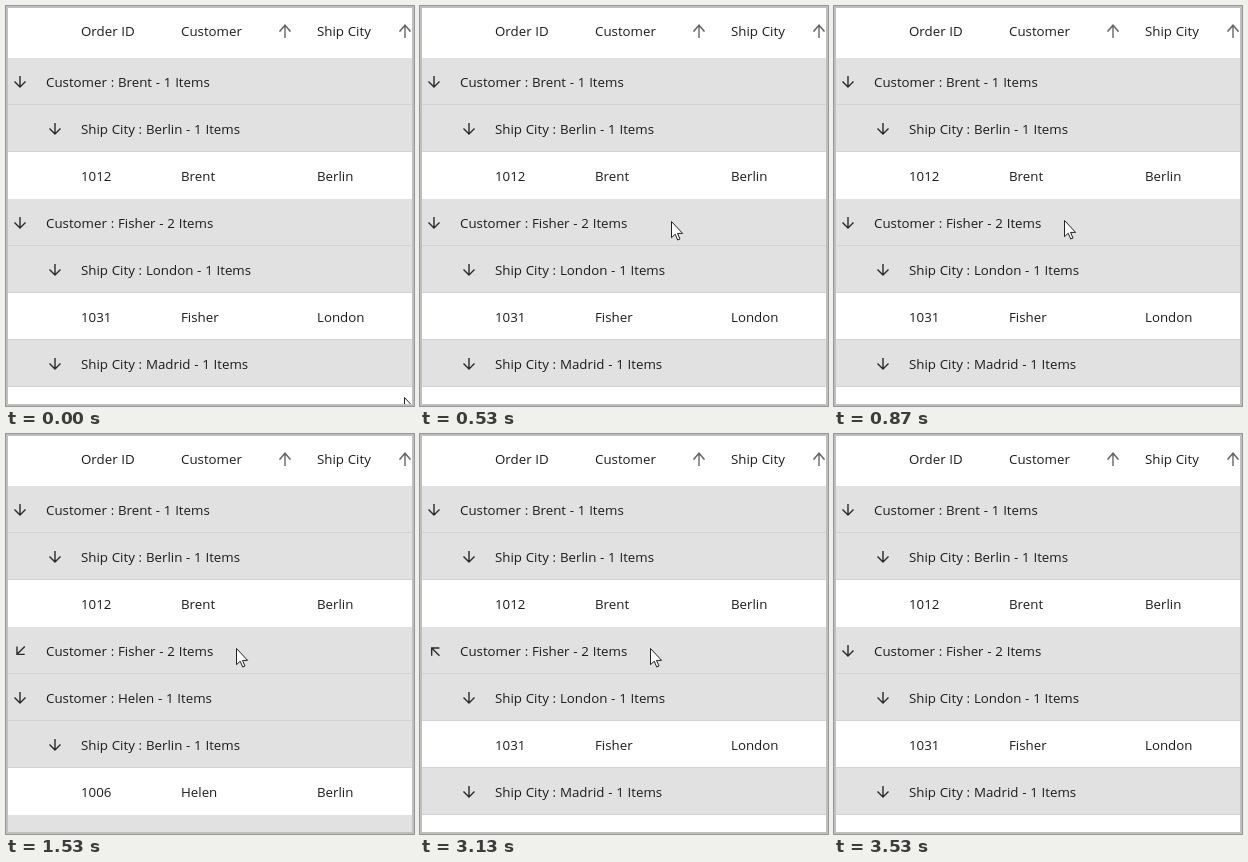
An HTML page for the animation above (4.59 s loop, 408x400 px).

```html
<!DOCTYPE html>
<html lang="en">
<head>
<meta charset="utf-8">
<title>Grouped orders</title>
<style>
  html, body { margin: 0; width: 100%; height: 100%; overflow: hidden; background: #fff; }
  svg { display: block; width: 408px; height: 400px; }
  text { font: 13.3px "Open Sans", "Noto Sans", sans-serif; word-spacing: .3px; fill: #1c1c1c; white-space: pre; }
  .arrow, .sort { fill: none; stroke: #2a2a2a; stroke-width: 1.4; }
  .sort { stroke: #666; }
</style>
</head>
<body>
<svg viewBox="0 0 408 400">
  <defs>
    <clipPath id="inner"><rect x="2" y="2" width="404" height="396"/></clipPath>
    <path id="down" d="M0-6V5M-5.5-.5L0 5L5.5-.5"/>
  </defs>
  <rect width="408" height="400" fill="#bfbfbf"/>
  <g clip-path="url(#inner)">
    <rect width="408" height="400" fill="#fff"/>
    <g id="fixed"></g>
    <g id="open"></g>
    <g id="closed"></g>
    <use id="toggle" class="arrow" href="#down" x="14" y="217"/>
    <path id="cursor" d="M.5 .5V16.7L4.2 13.2L6.7 19L9 18L6.5 12.4H11.6Z" fill="#fff" stroke="#222"/>
  </g>
</svg>
<script>
const LOOP = 4590, FRAME = 200 / 3;
const TOP = 52, ROW = 47, INDENT = 35;
const COLUMNS = [75, 175, 311];
const $ = id => document.getElementById(id);

const label = (x, y, s) => `<text x="${x}" y="${y}">${s}</text>`;
const cells = (y, values) => values.map((v, i) => label(COLUMNS[i], y, v)).join('');
const rect = (y, height, fill) => `<rect y="${y}" width="408" height="${height}" fill="${fill}"/>`;
const sortArrow = x => `<use class="sort" href="#down" transform="translate(${x} 25) scale(1 -1.15)"/>`;

// Level 0 is a customer group, level 1 a city group; arrays are data rows.
const customer = (name, n, turns) => ({ level: 0, text: `Customer : ${name} - ${n} Items`, turns });
const city = name => ({ level: 1, text: `Ship City : ${name} - 1 Items` });

function row(item, y, next) {
  if (Array.isArray(item)) {
    // The last data row of a customer has no separator.
    const line = next?.level === 1 ? rect(y + ROW - 1, 1, '#d3d3d3') : '';
    return line + cells(y + 29, item);
  }
  const x = INDENT * item.level;
  const arrow = item.turns ? '' : `<use class="arrow" href="#down" x="${x + 14}" y="${y + 24}"/>`;
  return rect(y, ROW, '#e1e1e1') + rect(y + ROW - 1, 1, '#d3d3d3') +
    arrow + label(x + 40, y + 29, item.text);
}
const rows = (list, first) =>
  list.map((item, i) => row(item, TOP + (first + i) * ROW, list[i + 1])).join('');

$('fixed').innerHTML =
  cells(30, ['Order ID', 'Customer', 'Ship City']) + sortArrow(279) + sortArrow(399) +
  rows([customer('Brent', 1), city('Berlin'), ['1012', 'Brent', 'Berlin'],
        customer('Fisher', 2, true)], 0);
$('open').innerHTML =
  rows([city('London'), ['1031', 'Fisher', 'London'], city('Madrid')], 4);
$('closed').innerHTML =
  rows([customer('Helen', 1), city('Berlin'), ['1006', 'Helen', 'Berlin'], customer('Irene', 1)], 4);

const CORNER = [398, 391], ARRIVAL = [251, 215], REST = [230, 214], OUTSIDE = [420, 410];
const span = (frame, from, to) => Math.min(1, Math.max(0, (frame - from) / (to - from)));
const easeOut = (p, power) => 1 - (1 - p) ** power;
const glide = (a, b, p) => a.map((v, i) => Math.round(v + (b[i] - v) * p));

function cursorAt(frame) {
  if (frame < 9) return glide(CORNER, ARRIVAL, easeOut(span(frame, 0, 8), 2.5));
  if (frame < 48) return glide(ARRIVAL, REST, easeOut(span(frame, 9, 13), 1.5));
  return glide(REST, OUTSIDE, span(frame, 48, 53) ** 2);
}

// Clockwise degrees away from pointing down.
const turnAt = frame =>
  180 * (easeOut(span(frame, 22, 27), 1.3) - easeOut(span(frame, 46, 51), 1.3));

function draw(t) {
  const frame = Math.floor((t + 5) / FRAME);
  const closed = frame >= 23 && frame < 47;
  $('open').style.display = closed ? 'none' : '';
  $('closed').style.display = closed ? '' : 'none';
  $('toggle').setAttribute('transform', `rotate(${turnAt(frame)} 14.5 217.5)`);
  $('cursor').setAttribute('transform', `translate(${cursorAt(frame)})`);
}

const start = performance.now();
function tick() {
  draw((performance.now() - start) % LOOP);
  requestAnimationFrame(tick);
}
tick();
</script>
</body>
</html>
```
